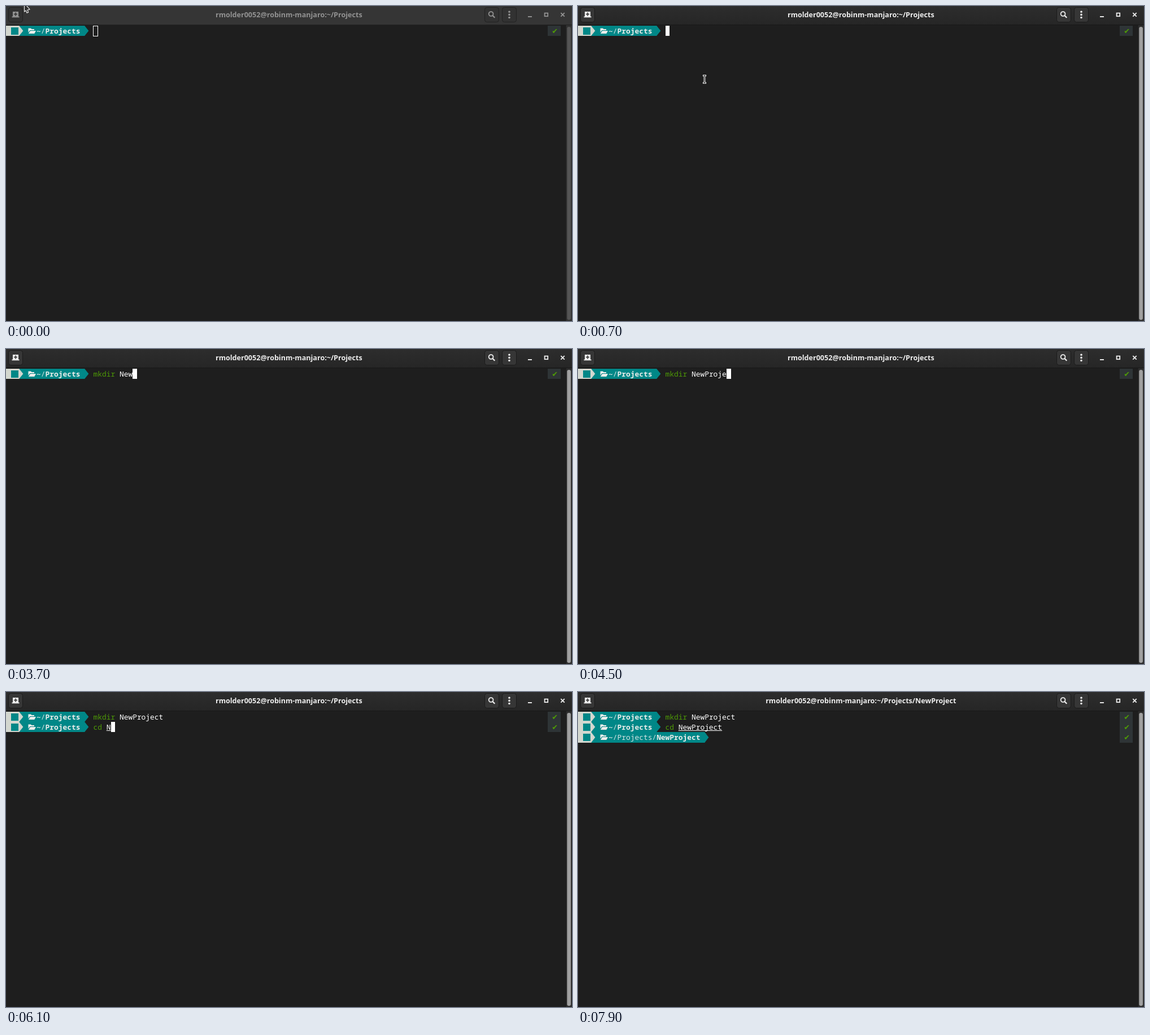
An HTML page with a canvas for the animation above (8000 ms loop, 1002x559 px).

```html
<!DOCTYPE html>
<html lang="en">
<head>
<meta charset="utf-8">
<title>Terminal</title>
<style>
  html, body { margin: 0; width: 100%; height: 100%; overflow: hidden; background: #1e1e1e; }
  canvas { display: block; width: 1002px; height: 559px; }
</style>
</head>
<body>
<canvas id="stage" width="1002" height="559"></canvas>
<script>
const ctx = document.getElementById('stage').getContext('2d');
const LOOP = 8000, COL = 7.73, ROW = 18.2, TOP = 35, START = 20;
const MONO = '12.88px "Noto Sans Mono", "DejaVu Sans Mono", monospace';
const TITLE = 'bold 12.57px "Noto Sans", "Open Sans", sans-serif';
const HOST = 'rmolder0052@robinm-manjaro:';
const TEAL = '#008787', PALE = '#d3d7cf', GREEN = '#4e9a06', RED = '#cc0000', GHOST = '#7f7f7f';

// time, row, typed text, suggested rest
const keys = [
  [0, 0, '', ''],
  [1600, 0, 'm', 'kdir src'],
  [1700, 0, 'mk', 'dir src'],
  [1800, 0, 'mkd', 'ir src'],
  [2200, 0, 'mkdi', 'r src'],
  [2300, 0, 'mkdir', ' src'],
  [2400, 0, 'mkdir ', 'src'],
  [3400, 0, 'mkdir N', 'rc'],
  [3500, 0, 'mkdir N', ''],
  [3700, 0, 'mkdir New', ''],
  [4000, 0, 'mkdir NewP', ''],
  [4200, 0, 'mkdir NewPr', ''],
  [4300, 0, 'mkdir NewPro', ''],
  [4400, 0, 'mkdir NewProj', ''],
  [4500, 0, 'mkdir NewProje', ''],
  [4600, 0, 'mkdir NewProjec', ''],
  [4800, 0, 'mkdir NewProject', ''],
  [5200, 1, '', ''],
  [5500, 1, 'c', 'd ..'],
  [5600, 1, 'cd ', '..'],
  [6100, 1, 'cd N', ''],
  [6700, 1, 'cd New', ''],
  [6900, 1, 'cd NewProject/', ''],
  [7300, 1, 'cd NewProject', ''],
  [7300, 2, '', '']
];
const blinkOff = [[1100, 1600], [3000, 3400], [7900, 8000]];

const rowTop = row => Math.round(TOP + ROW * row);
const baseline = row => rowTop(row) + 14;
const grey = (a, b, k) => {
  const v = Math.round(a + (b - a) * k);
  return `rgb(${v},${v},${v})`;
};

function rect(x, y, w, h, color) {
  ctx.fillStyle = color;
  ctx.fillRect(x, y, w, h);
}

function roundBox(x, y, w, h, r, fill, stroke) {
  ctx.beginPath();
  ctx.roundRect(x, y, w, h, r);
  ctx.fillStyle = fill;
  ctx.fill();
  if (stroke) {
    ctx.strokeStyle = stroke;
    ctx.lineWidth = 1;
    ctx.stroke();
  }
}

function poly(points, fill) {
  ctx.beginPath();
  points.forEach(([x, y]) => ctx.lineTo(x, y));
  ctx.closePath();
  ctx.fillStyle = fill;
  ctx.fill();
}

function line(points, color, width) {
  ctx.beginPath();
  points.forEach(([x, y], i) => i ? ctx.lineTo(x, y) : ctx.moveTo(x, y));
  ctx.strokeStyle = color;
  ctx.lineWidth = width;
  ctx.stroke();
}

function dot(x, y, r, color) {
  ctx.beginPath();
  ctx.arc(x, y, r, 0, Math.PI * 2);
  ctx.fillStyle = color;
  ctx.fill();
}

function write(text, col, row, color, bold) {
  ctx.font = (bold ? 'bold ' : '') + MONO;
  ctx.fillStyle = color;
  ctx.fillText(text, col * COL, baseline(row));
}

function header(t, focus) {
  const ink = grey(146, 238, focus);
  const shade = ctx.createLinearGradient(0, 0, 0, 33);
  shade.addColorStop(0, grey(53, 45, focus));
  shade.addColorStop(1, grey(53, 38, focus));
  rect(0, 0, 1002, 34, shade);
  rect(0, 33, 1002, 1, grey(32, 24, focus));

  for (const x of [4.5, 847.5, 878.5])
    roundBox(x, 2.5, 25, 26, 4, grey(50, 54, focus), grey(33, 27, focus));

  // new tab
  const hole = grey(50, 54, focus);
  rect(12, 10, 10, 9, ink);
  rect(10.5, 18.5, 13, 1.8, ink);
  rect(16.2, 11.5, 1.6, 6, hole);
  rect(14, 13.7, 6, 1.6, hole);

  // search
  ctx.beginPath();
  ctx.arc(858.6, 14, 3.9, 0, Math.PI * 2);
  ctx.strokeStyle = ink;
  ctx.lineWidth = 1.8;
  ctx.stroke();
  line([[861.3, 16.8], [865.3, 20.8]], ink, 2.2);

  for (const y of [10.3, 15.4, 20.5]) dot(891, y, 1.8, ink);
  rect(924, 18, 7, 1.9, ink);
  ctx.strokeStyle = ink;
  ctx.lineWidth = 1.8;
  ctx.strokeRect(953.6, 12.6, 5.6, 5.6);
  line([[982.3, 12.2], [988.7, 18.6]], ink, 1.9);
  line([[988.7, 12.2], [982.3, 18.6]], ink, 1.9);

  ctx.font = TITLE;
  ctx.textAlign = 'center';
  ctx.fillStyle = ink;
  ctx.fillText(HOST + '~/Projects' + (t >= 7300 ? '/NewProject' : ''), 500.8, 20);
  ctx.textAlign = 'left';
}

function scrollbar(focus) {
  rect(991, 34, 11, 525, grey(49, 45, focus));
  rect(991, 34, 1, 525, grey(38, 32, focus));
  roundBox(993.3, 37, 6.7, 520, 3.3, grey(84, 160, focus));
}

function arrow(col, row, color) {
  const x = col * COL, y = rowTop(row), b = rowTop(row + 1);
  poly([[x - 0.3, y], [x, y], [x + 7.2, (y + b) / 2], [x, b], [x - 0.3, b]], color);
}

function prompt(row) {
  const y = rowTop(row), h = rowTop(row + 1) - y;
  const deep = row === 2, end = deep ? 29 : 18;
  rect(0, y, end * COL, h, TEAL);
  arrow(end, row, TEAL);
  rect(0, y, 3 * COL, h, PALE);
  arrow(3, row, PALE);
  rect(9, y + 3, 13, 13, TEAL);

  // open folder
  poly([[39.5, y + 12], [39.5, y + 4.5], [44, y + 4.5], [45.5, y + 6], [50, y + 6],
        [50, y + 8], [42.5, y + 8]], '#eeeeec');
  poly([[43, y + 9], [53, y + 9], [50.3, y + 14], [39.8, y + 14]], '#eeeeec');

  write('~', 7, row, '#eeeeec', true);
  write(deep ? '/Projects/' : '/', 8, row, '#d7e4e4');
  write(deep ? 'NewProject' : 'Projects', deep ? 18 : 9, row, '#eeeeec', true);

  rect(959, y, 23, h, '#2e3436');
  ctx.font = '12.88px "DejaVu Sans", sans-serif';
  ctx.fillStyle = GREEN;
  ctx.fillText('\u2714', 966.3, y + 14);
}

function command(row, typed, rest) {
  const word = typed.split(' ')[0];
  const known = word === 'mkdir' || word === 'cd';
  write(word, START, row, known ? GREEN : RED, !known);

  const arg = typed.slice(word.length + 1);
  const argCol = START + word.length + 1;
  const name = arg.replace('/', '');
  write(name, argCol, row, '#ffffff');
  if (name !== arg) write('/', argCol + name.length, row, '#ffffff', true);
  if (row === 1 && arg)
    rect(argCol * COL, baseline(row) + 1, arg.length * COL, 1, '#ffffff');
  write(rest, START + typed.length, row, GHOST);
}

function cursor(t, row, typed, rest) {
  const col = START + typed.length, x = Math.round(col * COL);
  const y = rowTop(row), h = rowTop(row + 1) - y;
  if (t < 500) {
    ctx.strokeStyle = '#ffffff';
    ctx.lineWidth = 1;
    ctx.strokeRect(154.5, y + 0.5, 8, h);
    return;
  }
  if (blinkOff.some(([from, to]) => t >= from && t < to)) return;
  const ghost = rest && rest[0] !== ' ';
  rect(x, y, Math.round((col + 1) * COL) - x, h, ghost ? GHOST : '#ffffff');
  if (ghost) write(rest[0], col, row, '#1e1e1e');
}

function pointer(t) {
  if (t >= 1600) return;
  if (t < 200) {
    const shape = [[32.5, -5], [32.5, 10], [35.3, 8], [37, 12.3], [39.6, 11.2], [38, 7.2], [42, 6]];
    poly(shape, '#303030');
    line([...shape, shape[0]], '#f4f4f4', 1.1);
    return;
  }
  const k = t < 300 ? 0.6 : 1;
  const x = 33 + 191 * k, y = 130 * k;
  for (const [color, width, pad] of [['#e8e8e8', 3, 1], ['#1a1a1a', 1, 0]]) {
    line([[x, y - 6.5], [x, y + 6.5]], color, width);
    for (const s of [-6.5, 6.5])
      line([[x - 2 - pad, y + s], [x + 2 + pad, y + s]], color, width);
  }
}

function draw(t) {
  const focus = t < 500 ? 0 : Math.min(1, (Math.floor((t - 500) / 100) + 1) / 3);
  rect(0, 0, 1002, 559, '#1e1e1e');
  header(t, focus);
  scrollbar(focus);

  const past = keys.filter(key => key[0] <= t);
  const last = past[past.length - 1];
  for (let row = 0; row <= last[1]; row++) {
    const [, , typed, rest] = past.filter(key => key[1] === row).pop();
    prompt(row);
    command(row, typed, rest);
  }
  cursor(t, ...last.slice(1));
  pointer(t);
}

const begin = performance.now();
function tick() {
  draw((performance.now() - begin) % LOOP);
  requestAnimationFrame(tick);
}
tick();
</script>
</body>
</html>
```
